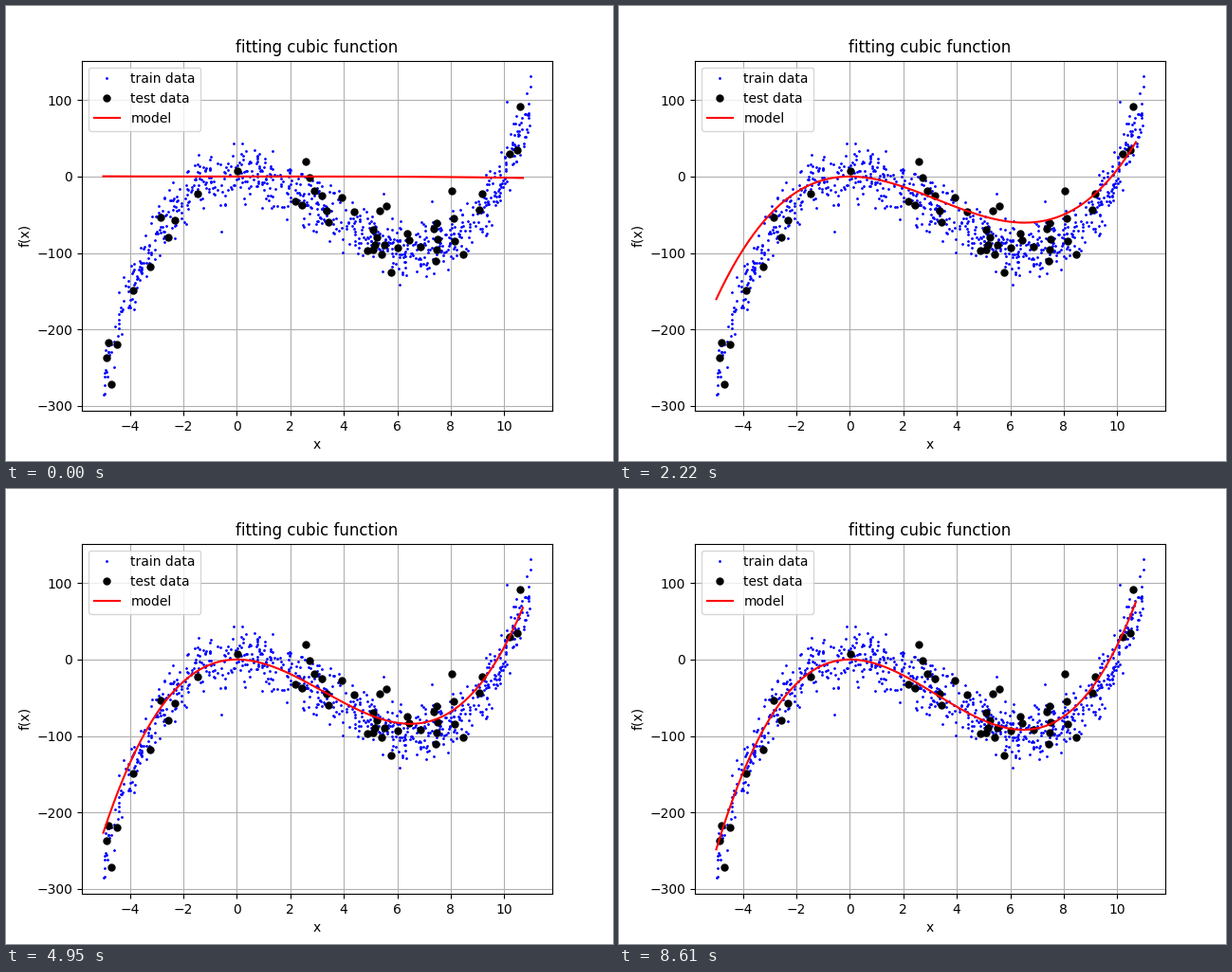
A matplotlib script for the animation above (8.74 s loop, 640x480 px).

```python
import numpy as np
import matplotlib.pyplot as plt
from matplotlib.animation import FuncAnimation

LOOP_MS = 8740
FRAMES = 292
LAST_STEP = 287

# Coefficients of x^3 and x^2
FINAL = np.array([0.688, -6.69])
SLOW = np.array([0.7012, -6.734])
FAST = np.array([0.0114, -0.0414])

TEST = np.array([
    (-4.88, -237), (-4.81, -217), (-4.49, -219.5), (-4.70, -271.5),
    (-3.88, -149), (-3.24, -118), (-2.84, -53.5), (-2.56, -79.5),
    (-2.34, -57.5), (-1.47, -22.5), (0.02, 7), (2.19, -32.5),
    (2.43, -37.5), (2.58, 19.5), (2.72, -1.5), (2.89, -19),
    (3.19, -25.5), (3.36, -45), (3.43, -60), (3.93, -27),
    (4.39, -46), (4.88, -97), (5.10, -70), (5.10, -95),
    (5.17, -90), (5.24, -80), (5.34, -45), (5.41, -102),
    (5.53, -90), (5.60, -39), (5.78, -125.5), (6.02, -93),
    (6.38, -75), (6.45, -83.5), (6.87, -92), (7.37, -68),
    (7.47, -61), (7.52, -82), (7.47, -95), (7.44, -110.5),
    (8.05, -19), (8.12, -55), (8.16, -85), (8.47, -102),
    (9.05, -44), (9.17, -22.5), (10.20, 29.5), (10.50, 34), (10.60, 91),
])

OUTLIERS = np.array([
    (11.0, 131), (-5.0, -285), (-0.6, -72), (10.08, 98),
    (6.07, -141), (-4.25, -131), (5.5, -22), (7.3, -32),
])


def make_train(count=800, sigma=18):
    rng = np.random.default_rng(4)
    x = rng.uniform(-5, 11, count)
    noise = np.clip(rng.normal(0, sigma, count), -2.3 * sigma, 2.1 * sigma)
    y = 0.7 * x**3 - 7 * x**2 + 6 + noise
    y = np.clip(y, -284, 118)
    return np.vstack([np.column_stack([x, y]), OUTLIERS])


def model(x, step):
    a, b = FINAL - SLOW * np.exp(-0.0137 * step) + FAST * np.exp(-0.3 * step)
    return a * x**3 + b * x**2


fig, ax = plt.subplots(figsize=(6.4, 4.8), dpi=100)
train = make_train()
xs = np.linspace(-5, 10.7, 80)

ax.plot(*train.T, "bo", markersize=1, label="train data")
ax.plot(*TEST.T, "ko", markersize=5, label="test data")
curve, = ax.plot(xs, model(xs, 0), "r-", label="model")

ax.set_xlim(-5.8, 11.8)
ax.set_ylim(-306.5, 151.5)
ax.set_title("fitting cubic function")
ax.set_xlabel("x")
ax.set_ylabel("f(x)")
ax.grid(True)
ax.legend(loc="upper left")


def update(frame):
    curve.set_ydata(model(xs, min(frame, LAST_STEP)))
    return curve,


anim = FuncAnimation(fig, update, frames=FRAMES, interval=LOOP_MS / FRAMES,
                     repeat=True, repeat_delay=0)
plt.show()
```
